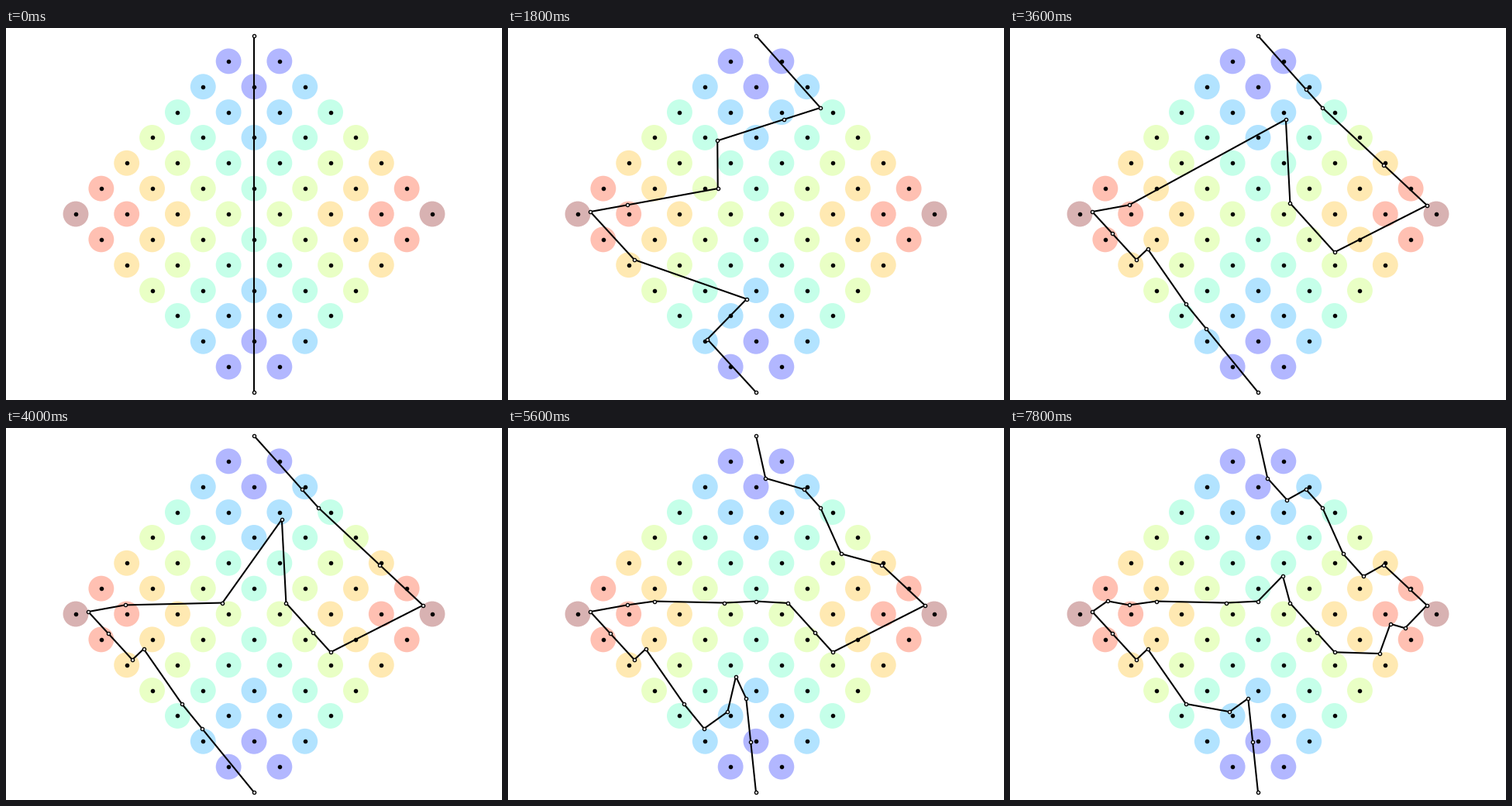
Recreate the animation shown at these times as a matplotlib script. Size 640x480 px, loop 8 s.

```python
import numpy as np
import matplotlib.pyplot as plt
from matplotlib.animation import FuncAnimation
from matplotlib.patches import Circle

W, H, DPI = 640, 480, 100
UNIT = 460 / 14
RADIUS = UNIT / 2
CENTER = np.array([W / 2, H / 2])

# Each step: disk to visit, then disk to drop from the route (None = nothing).
STEPS = [
    ((-2, -1), None), ((-7, 0), None), ((-2, -3), None), ((-5, 2), None),
    ((-5, 0), None), ((-2, 5), None), ((3, -4), None), ((0, 3), None),
    ((1, -4), None),
    ((-6, 1), None), ((7, 0), None), ((1, 0), (-2, -3)), ((2, -5), None),
    ((3, 2), (-2, 5)),
    ((-3, 4), None), ((5, -2), None), ((-2, 5), (-2, -1)), ((-4, 1), (0, 3)),
    ((2, 1), None), ((-1, 0), None), ((-4, -1), None), ((0, 3), (1, -4)),
    ((-1, 4), None), ((-1, 2), None),
    ((0, -5), None), ((3, -2), None), ((0, -1), None), ((0, 5), None),
    ((5, 0), None), ((1, -4), None), ((4, -1), None), ((2, -1), None),
    (None, (-2, 5)),
    ((6, 1), None), ((5, 2), (2, -1)), ((6, -1), None), ((1, -2), None),
    (None, (-1, 2)), ((-6, -1), None),
]


def place(cell):
    return CENTER + UNIT * np.array(cell, float)


def dist(a, b):
    return np.hypot(*(a - b))


def touch_point(a, b, disk):
    """Point of the disk nearest to segment ab, on the segment if they meet."""
    ab = b - a
    t = np.clip(np.dot(disk - a, ab) / np.dot(ab, ab), 0, 1)
    foot = a + t * ab
    gap = dist(foot, disk)
    return foot if gap <= RADIUS else disk + (foot - disk) * RADIUS / gap


def insert(route, cell):
    """Add the disk where it lengthens the route least."""
    disk = place(cell)
    best = None
    for i in range(len(route) - 1):
        a, b = route[i][1], route[i + 1][1]
        p = touch_point(a, b, disk)
        cost = dist(a, p) + dist(p, b) - dist(a, b)
        if best is None or cost < best[0] - 1e-9:
            best = cost, i + 1, p
    _, at, p = best
    return route[:at] + [(cell, p)] + route[at:]


def build_routes():
    route = [("start", place((0, -7))), ("end", place((0, 7)))]
    routes = [route]
    for add, drop in STEPS:
        if add is not None:
            route = insert(route, add)
        if drop is not None:
            route = [node for node in route if node[0] != drop]
        routes.append(route)
    return [np.array([p for _, p in r]) for r in routes]


fig = plt.figure(figsize=(W / DPI, H / DPI), dpi=DPI, facecolor="white")
ax = fig.add_axes([0, 0, 1, 1])
ax.set_xlim(0, W)
ax.set_ylim(H, 0)
ax.axis("off")

cells = [(x, y) for x in range(-7, 8) for y in range(-6, 7)
         if abs(x) + abs(y) <= 7 and (x + y) % 2]
for x, y in cells:
    level = (abs(x) - abs(y) + 7) / 2
    ax.add_patch(Circle(place((x, y)), RADIUS, facecolor=plt.cm.jet(level / 7),
                        edgecolor="none", alpha=0.3, zorder=1))
dots = np.array([place(c) for c in cells])
ax.plot(dots[:, 0], dots[:, 1], "ko", ms=3, mew=1, zorder=2)

path, = ax.plot([], [], "-o", color="black", lw=1.5, ms=3, mew=1,
                mfc="white", mec="black", zorder=3)
routes = build_routes()


def draw(frame):
    path.set_data(routes[frame].T)
    return path,


anim = FuncAnimation(fig, draw, frames=len(routes), interval=200,
                     repeat=True, repeat_delay=0)
plt.show()
```
